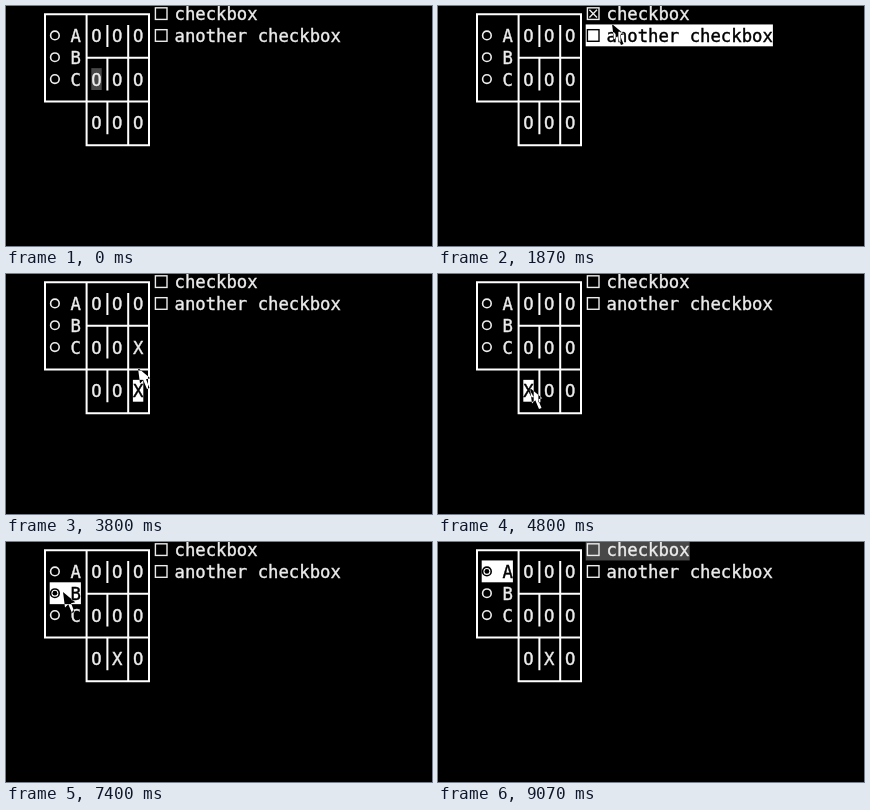
Recreate the animation shown at these times as an HTML page. Size 426 by 240 pixels, loop 9990 ms.

```html
<!DOCTYPE html>
<html lang="en">
<head>
<meta charset="utf-8">
<title>Terminal widgets</title>
<style>
  html, body { margin: 0; width: 100%; height: 100%; overflow: hidden; background: #000; }
  svg { display: block; width: 100vw; height: 100vh; isolation: isolate; }
  text { font: 17.27px "DejaVu Sans Mono", "Noto Sans Mono", monospace; stroke: currentColor; stroke-width: 0.4; }
  .lines { fill: none; stroke: #fff; stroke-width: 2; }
  .cursor { fill: #fff; mix-blend-mode: difference; }
</style>
</head>
<body>
<svg id="stage" viewBox="0 0 426 240"></svg>
<script>
const LOOP = 9990;
const CELL_W = 10.4, CELL_H = 21.85;
const INK = '#ececec', GRAY = '#484848';
const colX = c => 33.3 + c * CELL_W;
const rowY = r => -3.4 + r * CELL_H;
const midX = c => colX(c + 0.5);
const midY = r => rowY(r + 0.5);

const stage = document.getElementById('stage');
function add(tag, attrs, parent = stage) {
  const node = document.createElementNS('http://www.w3.org/2000/svg', tag);
  for (const key in attrs) node.setAttribute(key, attrs[key]);
  return parent.appendChild(node);
}
function addText(content, col, row, parent) {
  const node = add('text', { x: colX(col), y: rowY(row) + 17.5 }, parent);
  node.textContent = content;
  return node;
}

add('rect', { width: 426, height: 240 });

const widgets = {};
function addWidget(id, kind, col, row, span, label) {
  const group = add('g', { fill: 'currentColor' });
  const back = add('rect', { x: colX(col), y: rowY(row), width: span * CELL_W, height: CELL_H }, group);
  const widget = { kind, group, back };
  const x = midX(col), y = midY(row);
  if (kind === 'cell') {
    widget.text = addText('O', col, row, group);
  } else if (kind === 'radio') {
    add('circle', { cx: x, cy: y, r: 4.3, fill: 'none', stroke: 'currentColor', 'stroke-width': 1.6 }, group);
    widget.mark = add('circle', { cx: x, cy: y, r: 2.4, fill: 'currentColor' }, group);
    addText(label, col + 2, row, group);
  } else {
    const box = { fill: 'none', stroke: 'currentColor', 'stroke-width': 1.4 };
    const left = colX(col) + 1.7, top = y - 5.7;
    add('rect', { x: left, y: top, width: 11.6, height: 11.6, ...box }, group);
    widget.mark = add('path', { d: `M${left + 2} ${top + 2}l7.6 7.6m0 -7.6l-7.6 7.6`, ...box }, group);
    addText(label, col + 2, row, group);
  }
  widgets[id] = widget;
}

['A', 'B', 'C'].forEach((name, i) => addWidget(name, 'radio', 1, i + 1, 3, name));
for (let r = 0; r < 3; r++)
  for (let c = 0; c < 3; c++) addWidget(`cell${r}${c}`, 'cell', 5 + 2 * c, 1 + 2 * r, 1);
addWidget('check0', 'check', 11, 0, 10, 'checkbox');
addWidget('check1', 'check', 11, 1, 18, 'another checkbox');

const hLine = (row, from, to) => `M${midX(from)} ${midY(row)}H${midX(to)}`;
const vLine = (col, top, bottom) => `M${midX(col)} ${top}V${bottom}`;
const lines = add('g', { class: 'lines', transform: 'translate(0.5 0.6)' });
add('path', {
  'stroke-linecap': 'square',
  d: hLine(0, 0, 10) + hLine(2, 4, 10) + hLine(4, 0, 10) + hLine(6, 4, 10)
    + vLine(0, midY(0), midY(4)) + [4, 10].map(c => vLine(c, midY(0), midY(6))).join('')
}, lines);
add('path', {
  d: vLine(6, rowY(1), rowY(2)) + vLine(6, midY(2), rowY(4)) + vLine(6, midY(4), rowY(6))
    + vLine(8, rowY(1), midY(6))
}, lines);

const cursor = add('path', {
  class: 'cursor',
  d: 'M0 0L2 15.5L5.3 12.3L9 21L11.5 20L8 11.2L12.3 10.2Z'
});

// time, pointer position (null = off stage), hovered widget
const moves = [
  [0, null, null, 'cell10'],
  [70, 50, 62],
  [200, 82, 60],
  [330, 108, 56],
  [470, 134, 47],
  [600, 155, 38, 'check1'],
  [730, 166, 30, 'check1'],
  [800, 169, 27, 'check1'],
  [1130, 173, 8, 'check0'],
  [1330, 171, 27, 'check1'],
  [1870, 174, 18, 'check1'],
  [1930, 175, 6, 'check0'],
  [2400, 150, 40],
  [2470, 132, 71, 'cell12'],
  [3070, 132, 82, 'cell12'],
  [3200, 130, 100],
  [3330, 130, 117, 'cell22'],
  [3800, 132, 94, 'cell22'],
  [3870, 132, 74, 'cell12'],
  [4400, 135, 114, 'cell22'],
  [4600, 112, 114, 'cell21'],
  [4730, 92, 114, 'cell20'],
  [5470, 107, 112, 'cell21'],
  [5730, 107, 78, 'cell11'],
  [5870, 92, 76, 'cell10'],
  [6000, 99, 75, 'cell11'],
  [6130, 91, 76, 'cell10'],
  [6530, 75, 80],
  [6600, 62, 79, 'C'],
  [7130, 60, 59, 'B'],
  [7400, 57, 50, 'B'],
  [7530, 57, 30, 'A'],
  [7870, 58, 58, 'B'],
  [8070, 58, 76, 'C'],
  [8470, 65, 62, 'B'],
  [8800, 58, 40, 'A'],
  [9070, null, null, 'check0']
];

const clicks = [
  [1000, 'check1'], [1200, 'check0'], [1400, 'check1'], [1600, 'check1'],
  [1730, 'check1'], [2070, 'check0'], [2670, 'cell12'], [3600, 'cell22'],
  [3930, 'cell12'], [4470, 'cell22'], [4800, 'cell20'], [5000, 'cell20'],
  [5470, 'cell21'], [5930, 'cell10'], [6400, 'cell10'], [6930, 'C'],
  [7270, 'B'], [7670, 'A'], [8200, 'C'], [8600, 'B'], [8800, 'A']
];

function stateAt(time) {
  const checked = {};
  let focus = null, radio = null;
  for (const [at, id] of clicks) {
    if (at > time) break;
    focus = id;
    if (widgets[id].kind === 'radio') radio = id;
    else checked[id] = !checked[id];
  }
  if (radio) checked[radio] = true;
  return { checked, focus };
}

function render(time) {
  const { checked, focus } = stateAt(time);
  const [, x, y, hover] = moves.filter(move => move[0] <= time).pop();
  for (const id in widgets) {
    const { group, back, text, mark } = widgets[id];
    const focused = id === focus;
    group.setAttribute('color', focused ? '#000' : INK);
    back.setAttribute('fill', focused ? '#fff' : id === hover ? GRAY : 'none');
    if (text) text.textContent = checked[id] ? 'X' : 'O';
    else mark.setAttribute('visibility', checked[id] ? 'visible' : 'hidden');
  }
  cursor.setAttribute('visibility', x === null ? 'hidden' : 'visible');
  if (x !== null) cursor.setAttribute('transform', `translate(${x} ${y})`);
}

const start = performance.now();
function tick() {
  render((performance.now() - start) % LOOP);
  requestAnimationFrame(tick);
}
tick();
</script>
</body>
</html>
```
